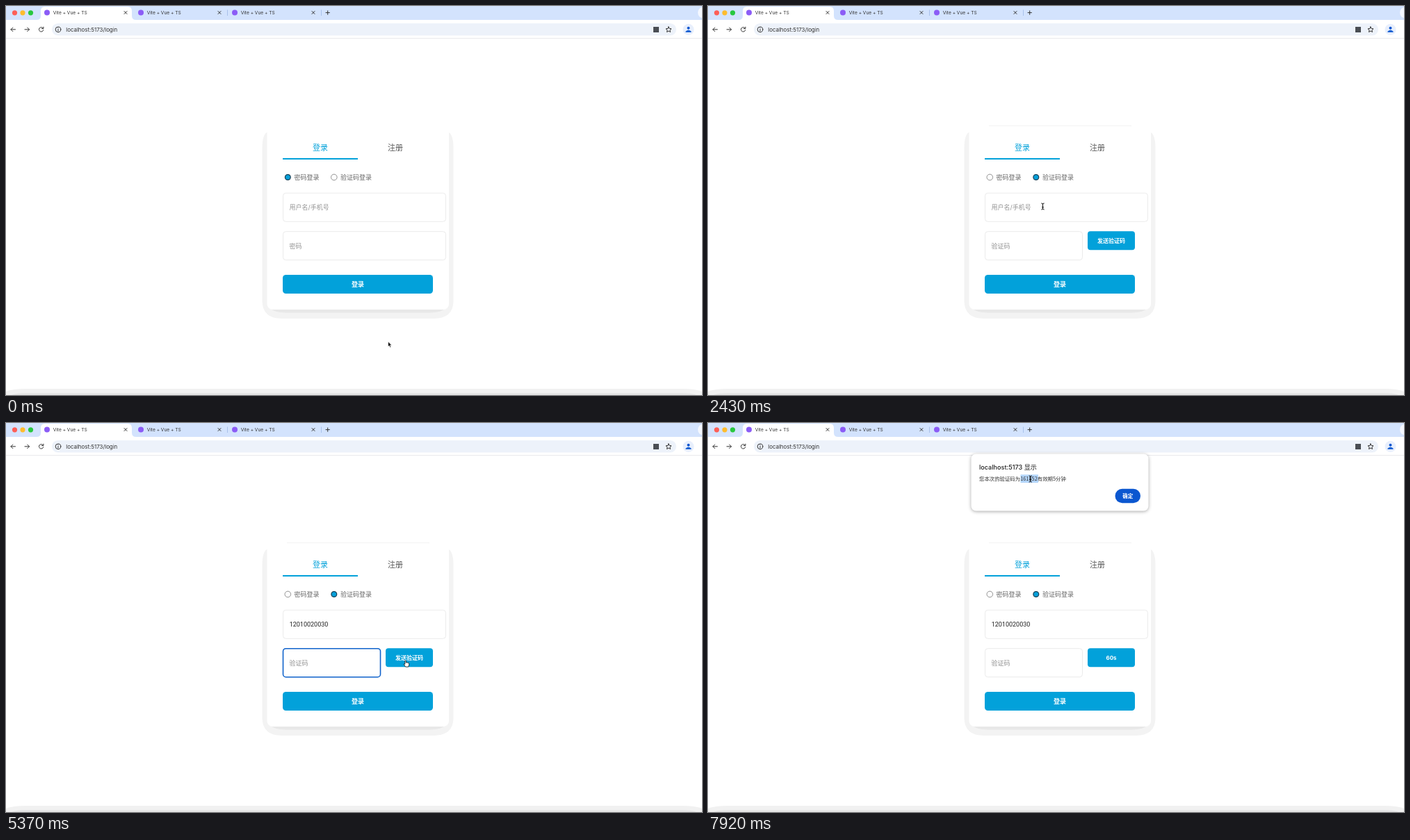
Recreate the animation shown at these times as an HTML page. Size 1001x560 px, loop 8 s.

```html
<!DOCTYPE html>
<html lang="zh">
<head>
<meta charset="utf-8">
<title>Login</title>
<style>
  html, body { margin: 0; width: 100%; height: 100%; overflow: hidden; background: #fff; }
  svg { display: block; width: 100%; height: 100%; }
  text { font-family: Inter, "Noto Sans CJK SC", "Noto Sans CJK", sans-serif; fill: #333; }
  .mid { text-anchor: middle; }
  .tab { font-size: 6.6px; }
  .head { font-size: 11px; font-weight: 500; text-anchor: middle; }
  .label { font-size: 9px; fill: #666; }
  .hint { font-size: 9px; fill: #929292; }
  .on { font-weight: 700; text-anchor: middle; fill: #fff; }
  .blue { fill: #02a1da; }
  .line { fill: none; stroke: #333; stroke-width: 1; stroke-linecap: round; stroke-linejoin: round; }
  .field { fill: #fff; stroke: #ebebeb; stroke-width: 1; }
  .field.focus { stroke: #0f62cb; stroke-width: 1.6; }
  .number { font-family: Roboto, "Noto Sans", sans-serif; font-size: 9px; fill: #222; }
  #alert { filter: drop-shadow(0 1px 2.5px rgba(0, 0, 0, .35)); }
  .pointer { fill: #111; stroke: #fff; stroke-width: .7; stroke-linejoin: round; }
</style>
</head>
<body>
<svg viewBox="0 0 1001 560" preserveAspectRatio="none">
  <!-- browser window -->
  <rect width="1001" height="20" fill="#d3e3fd"/>
  <circle cx="1003" cy="9.5" r="8" fill="#f4f8ff"/>
  <path d="M44 20Q50 20 50 14V7Q50 1 56 1H175Q181 1 181 7V14Q181 20 187 20Z" fill="#fff"/>
  <circle cx="12.5" cy="9.8" r="3.6" fill="#fe5f57"/>
  <circle cx="24" cy="9.8" r="3.6" fill="#febc2e"/>
  <circle cx="35.5" cy="9.8" r="3.6" fill="#28c840"/>
  <g id="tabs"></g>
  <path d="M318.5 5.500V14M453.500 5.500V14" stroke="#a9c1ea"/>
  <path class="line" d="M460 9.600H465.400M462.700 6.900V12.300"/>
  <rect x="66" y="25" width="898" height="17.500" rx="8.700" fill="#edf2fa"/>
  <path d="M0 46.500H1001" stroke="#e9e9ec"/>
  <g class="line">
    <path d="M13.500 33.800H7M9.800 31L7 33.800L9.800 36.600"/>
    <path d="M27 33.800H33.500M30.700 31L33.500 33.800L30.700 36.600"/>
    <path d="M53.800 34.600A3.200 3.200 0 1 1 53.200 31.800M53.900 30.200V32.600H51.500"/>
    <circle cx="75" cy="33.800" r="3.800"/>
    <path d="M75 33.600V35.800M75 31.800V31.900"/>
    <path d="M953 29.900L954.200 32.500L957 32.800L954.900 34.700L955.500 37.500L953 36L950.500 37.500L951.100 34.700L949 32.800L951.800 32.500Z"/>
  </g>
  <rect x="931" y="30" width="8" height="8" fill="#4a4e54"/>
  <circle cx="981.500" cy="33.800" r="8" fill="#e8effc"/>
  <circle cx="981.500" cy="31.700" r="2" fill="#0b57d0"/>
  <path d="M977.500 37.800V36.500Q981.500 32.800 985.500 36.500V37.800Z" fill="#0b57d0"/>
  <text x="86.300" y="36.600" font-size="7.900">localhost:5173/login</text>

  <!-- page and card -->
  <path d="M0 555Q10 551 28 551H973Q991 551 1001 555V560H0Z" fill="#f1f1f1"/>
  <path d="M8 560Q14 557 30 557H971Q987 557 993 560Z" fill="#e5e5e5"/>
  <path d="M375 182Q368.500 186 368.500 205V425Q369 450 397 450H615Q643 450 643.500 425V205Q643.500 186 637 182Z" fill="#f3f3f3"/>
  <path d="M380 435H632Q626 441.500 610 441.500H402Q386 441.500 380 435Z" fill="#e8e8e8"/>
  <rect x="375.500" y="173" width="261.500" height="264" rx="8" fill="#fff"/>
  <path id="cardTop" d="M404 172.500H609" stroke="#f2f2f2"/>
  <text class="head blue" x="452" y="208">登录</text>
  <text class="head" x="560" y="208" style="fill:#555">注册</text>
  <rect class="blue" x="398" y="219" width="108" height="2"/>
  <g id="radios"></g>
  <text class="label" x="414.500" y="249.800">密码登录</text>
  <text class="label" x="481" y="249.800">验证码登录</text>

  <rect id="userField" class="field" x="398.500" y="269.300" width="234" height="41" rx="4"/>
  <text id="userHint" class="hint" x="407.500" y="292.800">用户名/手机号</text>
  <text id="userText" class="number" x="407.700" y="292.800"></text>
  <rect id="codeField" class="field" x="398.500" y="324.700" width="234" height="41" rx="4"/>
  <text id="codeHint" class="hint" x="407.500" y="348.500">密码</text>
  <rect id="caret" width=".8" height="10" fill="#222"/>
  <g id="send">
    <rect class="blue" x="546" y="324.300" width="68" height="27" rx="4"/>
    <text id="sendText" class="on" x="580" y="341" font-size="8"></text>
  </g>
  <rect class="blue" x="398" y="387" width="216" height="27" rx="4.500"/>
  <text class="on" x="506" y="403.800" font-size="9">登录</text>

  <g id="alert">
    <rect x="378.500" y="44.500" width="255" height="82" rx="7" fill="#fff"/>
    <text x="390" y="66.500" font-size="9.100" font-weight="500" style="fill:#222">localhost:5173 显示</text>
    <rect id="selection" x="449.500" y="74.300" width="25.500" height="11.700" fill="#b3d5fb"/>
    <text x="390" y="83" font-size="7.400" style="font-family:'Noto Sans CJK SC','Noto Sans CJK',sans-serif">您本次的验证码为161852有效期5分钟</text>
    <rect x="585.500" y="94.700" width="36.500" height="20.500" rx="10.200" fill="#0b57d0"/>
    <text class="on" x="603.700" y="107.700" font-size="7.500">确定</text>
  </g>

  <g id="cursor">
    <path id="arrow" class="pointer" d="M0 0V7.600L1.700 6.100L2.900 8.700L4.200 8.100L3.100 5.600H5.400Z"/>
    <path id="beam" class="line" d="M-1.700 -4.500Q0 -4.500 0 -3.300Q0 -4.500 1.700 -4.500M0 -3.300V3.300M-1.700 4.500Q0 4.500 0 3.300Q0 4.500 1.700 4.500M-1 1.200H1" style="stroke:#111"/>
    <path id="hand" d="M-.7 .3Q0 -.6 .8 .3V3Q1.700 2.400 2.300 3.100Q3.200 2.600 3.800 3.400Q4.900 3 5.200 4.200V6.300L4.200 9H.2L-2.400 5.600Q-2.500 4.400 -.7 5.300Z" fill="#fff" stroke="#111" stroke-width=".8"/>
  </g>
</svg>
<script>
const $ = id => document.getElementById(id);
const show = (id, on) => $(id).style.display = on ? "" : "none";

const LOOP = 8000, PHONE = "12010020030", BLINK = 475;
const PICK_CODE = 1830, FOCUS_USER = 2520, TYPE_START = 2730, TYPE_END = 3360;
const FOCUS_CODE = 3930, SEND = 5970, ALERT = 6570, SELECT = 7740;

// Pointer path: time, x, y
const path = [
  [0, 549.5, 483], [450, 549.5, 483], [1020, 479, 288.5], [1350, 479, 288.5],
  [1740, 472, 243], [2190, 472, 243], [2420, 481.5, 288.5], [3540, 481.5, 288.5],
  [3900, 498.5, 337.5], [4080, 497, 347], [4290, 497, 347], [5010, 574.5, 342],
  [6750, 574.5, 342], [7500, 463.7, 80.5], [LOOP, 463.7, 80.5]
];

$("tabs").innerHTML = [0, 135, 270].map(x => `<g transform="translate(${x})">
  <circle cx="59" cy="9.5" r="4" fill="#8b5cf6"/>
  <text class="tab" x="67.700" y="11.800">Vite + Vue + TS</text>
  <path class="line" d="M170 7.500L174 11.500M174 7.500L170 11.500"/></g>`).join("");

const radio = (x, on) => on
  ? `<circle cx="${x}" cy="246.500" r="3.900" fill="#06a0da" stroke="#1d4256" stroke-width="1.300"/>`
  : `<circle cx="${x}" cy="246.500" r="4.300" fill="#fff" stroke="#777" stroke-width=".8"/>`;

function pointerAt(t) {
  const i = Math.max(1, path.findIndex(p => p[0] >= t));
  const [t0, x0, y0] = path[i - 1], [t1, x1, y1] = path[i];
  const u = (t - t0) / (t1 - t0), k = u * u * (3 - 2 * u);
  return [x0 + (x1 - x0) * k, y0 + (y1 - y0) * k];
}

function pointerKind(t, x, y, codeMode) {
  const inside = (l, top, r, b) => x > l && x < r && y > top && y < b;
  if (t >= ALERT) return inside(390, 74, 516, 87) ? "beam" : "arrow";
  if (codeMode && t < SEND && inside(546, 324, 614, 351)) return "hand";
  const overField = inside(398, 269, 633, 310) || inside(398, 324, codeMode ? 539 : 633, 366);
  return overField ? "beam" : "arrow";
}

function draw(t) {
  const codeMode = t >= PICK_CODE;
  const userFocus = t >= FOCUS_USER && t < FOCUS_CODE;
  const codeFocus = t >= FOCUS_CODE && t < SEND;
  const progress = (t - TYPE_START) / (TYPE_END - TYPE_START);
  const typed = t < TYPE_START ? 0 : Math.min(PHONE.length, 1 + Math.floor(progress * (PHONE.length - 1)));

  show("cardTop", t >= 450);
  $("radios").innerHTML = radio(405.3, !codeMode) + radio(471.8, codeMode);
  $("userField").classList.toggle("focus", userFocus);
  $("codeField").classList.toggle("focus", codeFocus);
  $("codeField").setAttribute("width", codeMode ? 140 : 234);
  $("codeHint").textContent = codeMode ? "验证码" : "密码";
  show("userHint", !typed);
  $("userText").textContent = PHONE.slice(0, typed);
  show("send", codeMode);
  $("sendText").textContent = t < SEND ? "发送验证码" : "60s";

  const blinkStart = codeFocus ? FOCUS_CODE : t < TYPE_START ? FOCUS_USER : Math.min(t, TYPE_END);
  show("caret", (userFocus || codeFocus) && Math.floor((t - blinkStart) / BLINK) % 2 === 0);
  $("caret").setAttribute("x", 407.7 + (userFocus ? typed * 5.05 : 0));
  $("caret").setAttribute("y", userFocus ? 284.5 : 340.2);

  show("alert", t >= ALERT);
  show("selection", t >= SELECT);

  const [x, y] = pointerAt(t), kind = pointerKind(t, x, y, codeMode);
  for (const id of ["arrow", "beam", "hand"]) show(id, id === kind);
  $("cursor").setAttribute("transform", `translate(${x} ${y})`);
}

const start = performance.now();
function tick() {
  draw((performance.now() - start) % LOOP);
  requestAnimationFrame(tick);
}
tick();
</script>
</body>
</html>
```
